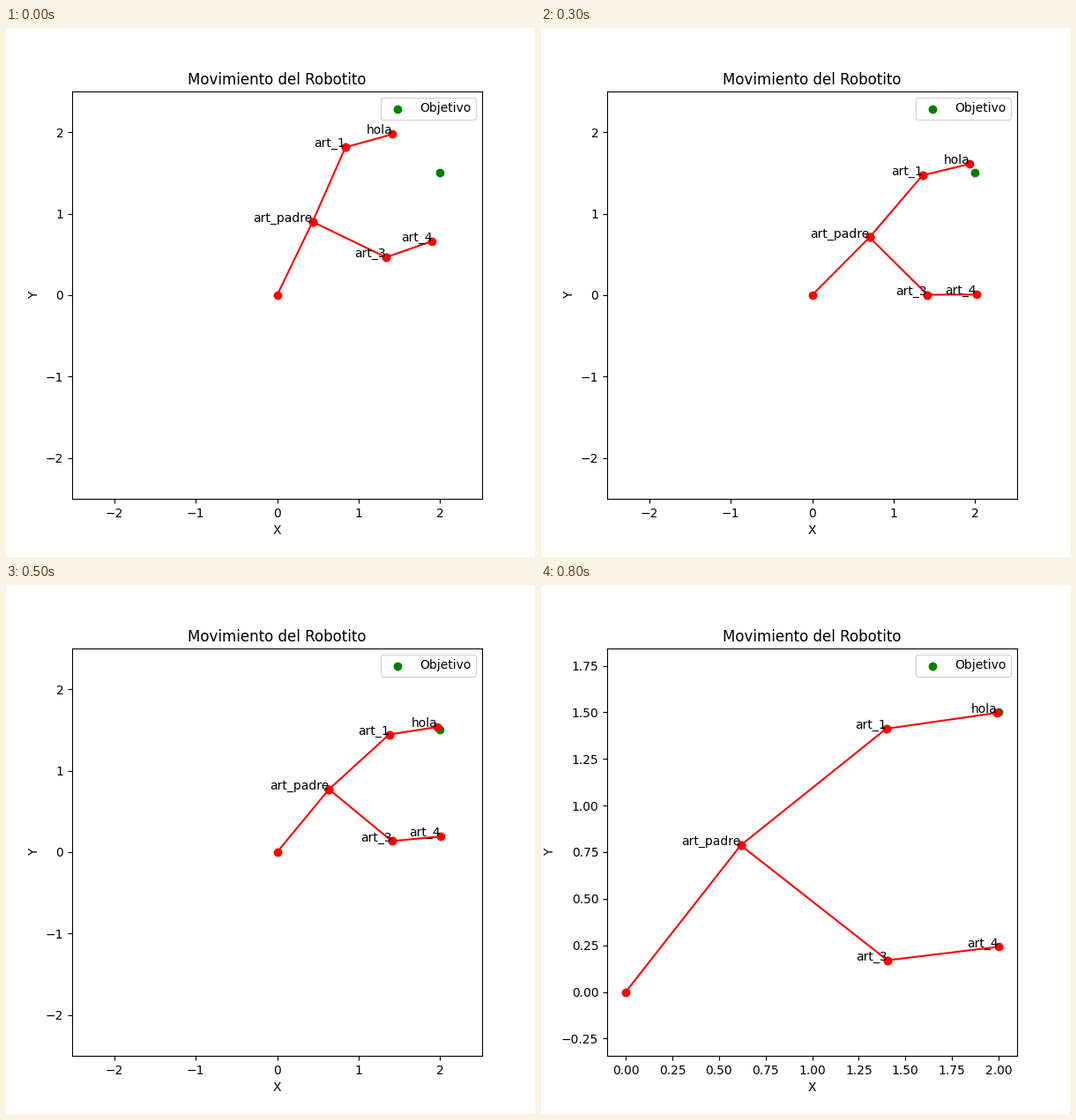
A matplotlib script that plays this animation: 600 by 600 pixels, repeating every 0.9 s.

```python
import numpy as np
import matplotlib.pyplot as plt
from matplotlib.animation import FuncAnimation

plt.rcParams["font.family"] = "DejaVu Sans"

GOAL = (2.0, 1.5)
LONG, SHORT = 1.0, 0.6
RATIO = 465 / 462  # axes width over height

# Absolute angles in degrees per step: shoulder, elbow, wrist
POSES = [
    (64.2, 66.2, 15.5),
    (58.6, 60.3, 16.8),
    (53.2, 54.4, 18.0),
    (45.2, 49.5, 13.7),
    (50.4, 44.7, 9.4),
    (50.5, 42.3, 8.8),
    (50.9, 40.3, 8.2),
    (51.9, 38.7, 8.2),
    (51.9, 38.7, 8.2),
]
LAST = len(POSES) - 1
NAMES = ["art_padre", "art_1", "hola", "art_3", "art_4"]


def step(start, length, degrees):
    t = np.radians(degrees)
    return start + length * np.array([np.cos(t), np.sin(t)])


def links(shoulder, elbow, wrist):
    """Segments of the arm, each ending at the joint of the same index."""
    base = np.zeros(2)
    root = step(base, LONG, shoulder)
    upper = step(root, LONG, elbow)
    hand = step(upper, SHORT, wrist)
    # The second branch is rigidly attached to the shoulder link
    lower = step(root, LONG, shoulder - 90)
    tip = step(lower, SHORT, shoulder - 45)
    return [(base, root), (root, upper), (upper, hand),
            (root, lower), (lower, tip)]


fig, ax = plt.subplots(figsize=(6, 6), dpi=100)
ax.set_title("Movimiento del Robotito")
ax.set_xlabel("X")
ax.set_ylabel("Y")
ax.scatter(*GOAL, color="green", label="Objetivo")
ax.legend(loc="upper right")

lines = [ax.plot([], [], "ro-")[0] for _ in NAMES]
labels = [ax.text(0, 0, name, ha="right") for name in NAMES]


def set_view(fitted):
    if fitted:
        ax.set_xlim(-0.1, 2.1)
        half = 1.1 / RATIO
        ax.set_ylim(0.75 - half, 0.75 + half)
    else:
        ax.set_xlim(-2.5 * RATIO, 2.5 * RATIO)
        ax.set_ylim(-2.5, 2.5)


def update(i):
    set_view(i == LAST)
    for (a, b), line, label in zip(links(*POSES[i]), lines, labels):
        line.set_data([a[0], b[0]], [a[1], b[1]])
        label.set_position(b)
    return lines + labels


anim = FuncAnimation(fig, update, frames=len(POSES), interval=100,
                     repeat=True, repeat_delay=0, blit=False)
plt.show()
```
